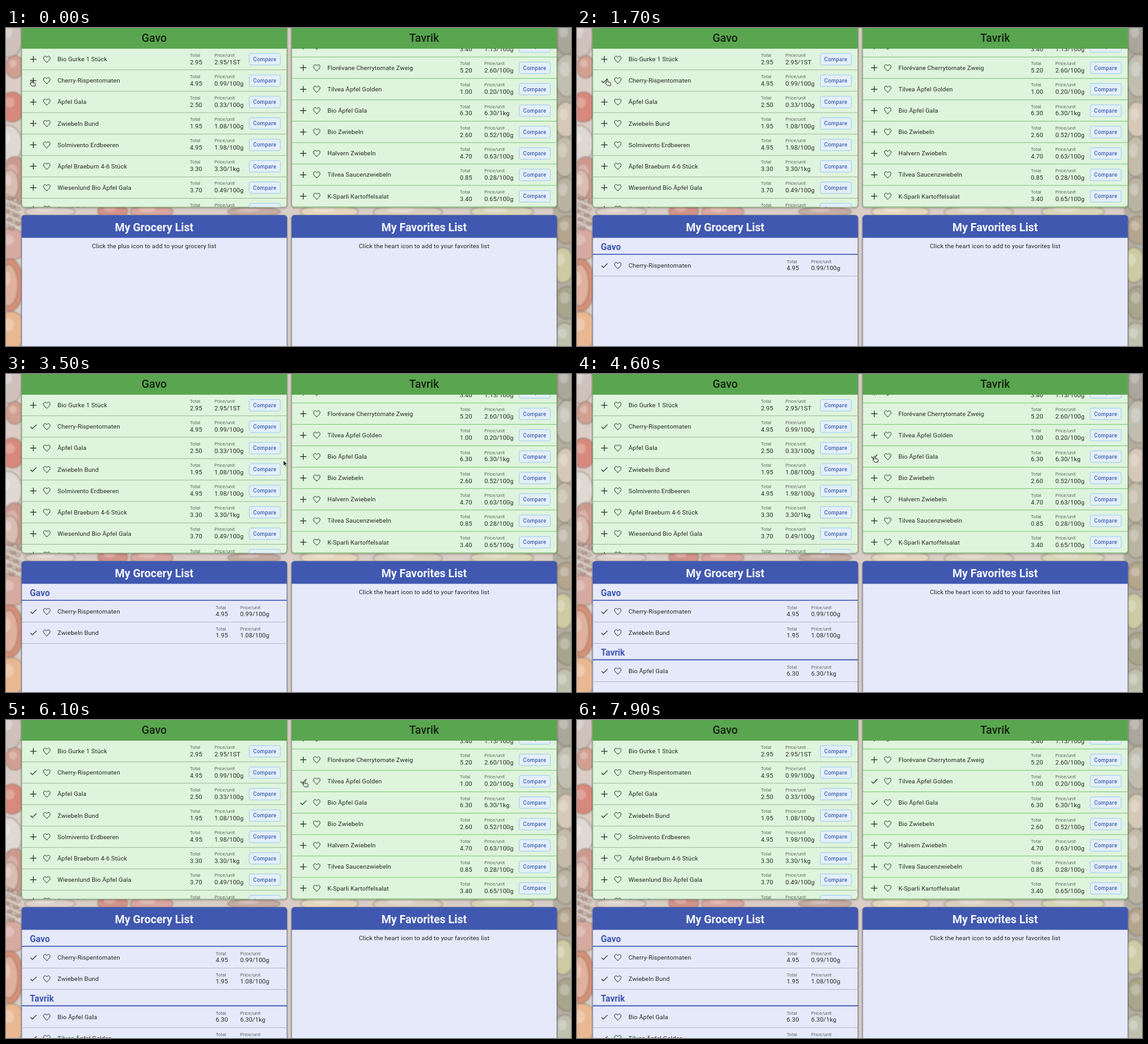
These frames come from a looping animation (900 px wide and 507 px high, 8000 ms). An HTML page:

```html
<!DOCTYPE html>
<html lang="en">
<head>
<meta charset="utf-8">
<title>Grocery list</title>
<style>
html, body { margin: 0; width: 100%; height: 100%; overflow: hidden; background: #d9cdc6; }
#stage { display: block; width: 100%; height: 100%; }
text { font: 400 9.9px Roboto, sans-serif; letter-spacing: .00938em; fill: #222c25; }
.title { font-size: 17.7px; font-weight: 600; letter-spacing: 0; text-anchor: middle; }
.shop { font-weight: 500; fill: #14230f; }
.white { fill: #f4f6fc; }
.section { font-size: 14px; font-weight: 600; letter-spacing: 0; fill: #3d56b2; }
.hint { text-anchor: middle; }
.label { font-size: 7.3px; fill: #5b655f; }
.button { font-size: 8.6px; font-weight: 500; letter-spacing: .02857em; text-anchor: middle; fill: #4463b6; }
.icon { fill: none; stroke: #2c362f; stroke-width: 1.2; }
.heart { stroke-width: 1; }
</style>
</head>
<body>
<svg id="stage" viewBox="0 0 900 507" preserveAspectRatio="none">
  <defs>
    <filter id="soft" x="-5%" y="-5%" width="110%" height="110%"><feGaussianBlur stdDeviation="1.2"/></filter>
  </defs>
  <g id="backdrop" filter="url(#soft)"></g>
  <g id="cards"></g>
  <path id="arrow" d="M0 0V8.4L2 6.6 3.3 9.5 4.6 8.9 3.4 6.1H6Z" fill="#111" stroke="#fff" stroke-width=".6"/>
  <path id="hand" d="M0 0c1 0 1.2.6 1.2 1.2V4l3.6.8c.8.2 1.2.7 1.1 1.5L5.3 9.7H.3L-2.6 6.2c-.5-.7.4-1.5 1.2-.9l.4.4V1.2C-1 .4-.7 0 0 0z" fill="#e9eeea" stroke="#333" stroke-width="1"/>
</svg>
<script>
const NS = 'http://www.w3.org/2000/svg';
const LOOP = 8000, STEP = 100, PITCH = 34.13, COLUMN = 430;
const byId = id => document.getElementById(id);
const timed = [];

function add(parent, tag, attrs, content) {
  const node = document.createElementNS(NS, tag);
  for (const key in attrs) node.setAttribute(key, attrs[key]);
  if (content) node.textContent = content;
  return parent.appendChild(node);
}
const label = (parent, x, y, content, cls = '') => add(parent, 'text', { x, y, class: cls }, content);
const rule = (parent, x, y, stroke, width = 1) =>
  add(parent, 'path', { d: `M${x} ${y}h422.5`, stroke, 'stroke-width': width });

// Shows a node only while from <= time < to.
const during = (node, from, to = LOOP) => timed.push({ node, from, to });

// A viewport that clips its content but keeps stage coordinates.
const clip = (x, y, width, height) =>
  add(byId('cards'), 'svg', { x, y, width, height, viewBox: `${x} ${y} ${width} ${height}` });

// name, total, unit price, time of the click that adds it
const first = [
  ['Bio Gurke 1 Stück', '2.95', '2.95/1ST'],
  ['Cherry-Rispentomaten', '4.95', '0.99/100g', 800],
  ['Äpfel Gala', '2.50', '0.33/100g'],
  ['Zwiebeln Bund', '1.95', '1.08/100g', 2800],
  ['Solmivento Erdbeeren', '4.95', '1.98/100g'],
  ['Äpfel Braeburn 4-6 Stück', '3.30', '3.30/1kg'],
  ['Wiesenlund Bio Äpfel Gala', '3.70', '0.49/100g'],
  ['Snack Salat', '2.80', '1.40/100g']
];
const second = [
  ['Rote Trauben', '3.40', '1.13/100g'],
  ['Florévane Cherrytomate Zweig', '5.20', '2.60/100g'],
  ['Tilvea Äpfel Golden', '1.00', '0.20/100g', 5600],
  ['Bio Äpfel Gala', '6.30', '6.30/1kg', 4300],
  ['Bio Zwiebeln', '2.60', '0.52/100g'],
  ['Halvern Zwiebeln', '4.70', '0.63/100g'],
  ['Tilvea Saucenzwiebeln', '0.85', '0.28/100g'],
  ['K-Sparli Kartoffelsalat', '3.40', '0.65/100g']
];
const shops = [
  { name: 'Gavo', items: first, top: 49.7, line: '#a0b99e' },
  { name: 'Tavrik', items: second, top: 29.2, line: '#7fc77b' }
];

function drawRow(parent, x, y, [name, total, price, clickedAt], line, listed) {
  const g = add(parent, 'g', { transform: `translate(${x} ${y})` });
  rule(g, 25, 17, line);
  const check = add(g, 'path', { d: 'M39 .4l3 3 6.6-6.6', class: 'icon' });
  if (!listed) {
    const plus = add(g, 'path', { d: 'M38.5 .1h10M43.5-4.9v10', class: 'icon' });
    during(plus, 0, clickedAt);
    during(check, clickedAt ?? LOOP);
  }
  add(g, 'path', {
    d: 'M65 5.2C61.5 2 59.8.3 59.8-1.9c0-3.3 3.7-3.8 5.2-1.1 1.5-2.7 5.2-2.2 5.2 1.1C70.2.3 68.5 2 65 5.2z',
    class: 'icon heart'
  });
  label(g, 82, 3.5, name);
  const shift = listed ? 41 : 0;
  label(g, 293 + shift, -4, 'Total', 'label');
  label(g, 293 + shift, 7.8, total);
  label(g, 332 + shift, -4, 'Price/unit', 'label');
  label(g, 332 + shift, 7.8, price);
  if (!listed) {
    add(g, 'rect', { x: 387.5, y: -9, width: 49.5, height: 18.4, rx: 2.5, fill: '#e3eff8', stroke: '#9fcdf0' });
    label(g, 412.2, 3.2, 'Compare', 'button');
  }
  return g;
}

function drawCard(x, y, height, fill, stroke) {
  const frame = { x, y, width: 422.5, height, rx: 5 };
  add(byId('cards'), 'rect', { ...frame, y: y + 1, fill: 'none', stroke: '#000', 'stroke-opacity': .13, 'stroke-width': 4 });
  add(byId('cards'), 'rect', { ...frame, fill, stroke, 'stroke-width': .9 });
}

function drawShop({ name, items, top, line }, column) {
  const shift = column * COLUMN, x = 25 + shift;
  drawCard(x, -10, 295.7, '#dff4dc', '#6f9a68');
  const body = clip(x, 33, 422.5, 252.5);
  items.forEach((item, i) => drawRow(body, shift, top + i * PITCH, item, line));
  add(byId('cards'), 'rect', { x, y: 0, width: 422.5, height: 33, fill: '#5aa650' });
  label(byId('cards'), x + 211, 22, name, 'title shop');
}

function drawPanel(title, hint, column) {
  const x = 25 + column * COLUMN;
  const cards = byId('cards');
  drawCard(x, 298.6, 220, '#e6e9f9', '#73798f');
  add(cards, 'path', { d: `M${x} 334.6v-31q0-5 5-5h412.5q5 0 5 5v31z`, fill: '#4058b0' });
  label(cards, x + 211, 324, title, 'title white');
  return label(cards, x + 211, 351, hint, 'hint');
}

function drawSection(name, y, from) {
  const g = add(byId('cards'), 'g', {});
  label(g, 38, y, name, 'section');
  rule(g, 25, y + 6.8, '#4059b5', 1.6);
  during(g, from);
}

function drawBackdrop() {
  const g = byId('backdrop');
  // A fruit: dark rim, body and a paler spot.
  const blob = (cx, cy, rx, ry, fill) => {
    add(g, 'ellipse', { cx, cy, rx, ry, fill, stroke: '#6b5a50', 'stroke-opacity': .3, 'stroke-width': 2.5 });
    add(g, 'ellipse', { cx: cx - rx * .2, cy: cy - ry * .3, rx: rx * .4, ry: ry * .35, fill: '#fff', opacity: .25 });
  };
  add(g, 'rect', { x: -9, y: -9, width: 880, height: 525, fill: '#d9cdc6' });
  add(g, 'rect', { x: 871, y: -9, width: 40, height: 525, fill: '#b3ada0' });
  [
    [6, 15, 20, 32, '#cfc2bc'], [14, 62, 15, 18, '#d0a092'], [10, 126, 20, 24, '#d6897b'],
    [2, 185, 24, 30, '#dfd8d3'], [14, 240, 22, 35, '#cb9a8f'], [6, 250, 14, 24, '#dabdb1'],
    [8, 345, 26, 25, '#d5aaa0'], [6, 410, 22, 42, '#d59078'], [4, 410, 15, 33, '#e0b19c'],
    [8, 482, 24, 30, '#e8b893'], [70, 293, 40, 10, '#dcd0c8'], [170, 292, 24, 13, '#d1928a'],
    [232, 293, 34, 12, '#d8a69e'], [395, 293, 42, 8, '#c4aca2'], [515, 293, 46, 12, '#e4d6be'],
    [640, 294, 55, 13, '#d9cfbe'], [790, 293, 50, 12, '#d8d5b9'], [892, 14, 18, 28, '#a9a69b'],
    [894, 76, 20, 34, '#bfbeb0'], [892, 146, 18, 28, '#d5c8b6'], [890, 205, 18, 32, '#c4bba9'],
    [891, 266, 18, 28, '#b9b3a2'], [893, 322, 18, 22, '#b4a58f'], [887, 378, 18, 28, '#cccba3'],
    [894, 438, 20, 26, '#a7a58c'], [890, 494, 18, 24, '#bfc0ae']
  ].forEach(spec => blob(...spec));
  for (let i = 0; i < 16; i++) {
    blob((i * 7.3) % 25, 268 + i * 3.4, 4, 2.6, i % 2 ? '#c09a8e' : '#d8bfb3');
  }
}

drawBackdrop();
shops.forEach(drawShop);
during(drawPanel('My Grocery List', 'Click the plus icon to add to your grocery list', 0), 0, 800);
drawPanel('My Favorites List', 'Click the heart icon to add to your favorites list', 1);
drawSection(shops[0].name, 354, 800);
drawSection(shops[1].name, 448.8, 4300);
[[first[1], 378.5], [first[3], 412.6], [second[3], 473.5], [second[2], 507.6]].forEach(([item, y]) =>
  during(drawRow(byId('cards'), 0, y, item, '#b7bbc9', true), item[3]));

// time, x, y of the pointer tip
const path = [
  [0, 41, 83], [1200, 41, 83], [1700, 48, 82], [2200, 43, 147], [3000, 43, 147], [3500, 442, 138],
  [4000, 474, 131], [5000, 474, 131], [5500, 475.5, 97], [6400, 475.5, 97], [7300, 452, 530], [LOOP, 452, 530]
];

function pointerAt(time) {
  const next = path.findIndex(([t]) => t > time);
  const [t0, x0, y0] = path[next - 1], [t1, x1, y1] = path[next];
  const u = (time - t0) / (t1 - t0), eased = u * u * (3 - 2 * u);
  return [x0 + (x1 - x0) * eased, y0 + (y1 - y0) * eased];
}

const show = (node, visible) => node.setAttribute('visibility', visible ? 'visible' : 'hidden');

function render(time) {
  for (const { node, from, to } of timed) show(node, time >= from && time < to);
  const [x, y] = pointerAt(time);
  const onIcon = [43.5, 473.5].some(icon => Math.abs(x - icon) < 9) && y < 280;
  for (const id of ['hand', 'arrow']) {
    byId(id).setAttribute('transform', `translate(${x} ${y})`);
    show(byId(id), (id === 'hand') === onIcon);
  }
}

let start;
function tick(now) {
  start ??= now;
  render(Math.floor(((now - start) % LOOP) / STEP) * STEP);
  requestAnimationFrame(tick);
}
render(0);
requestAnimationFrame(tick);
</script>
</body>
</html>
```
